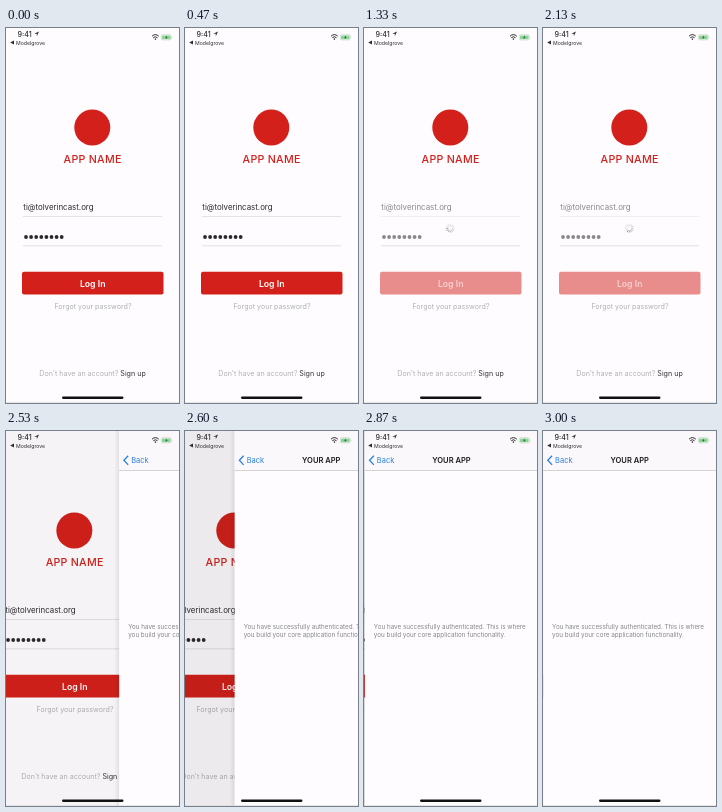
Write an HTML page that moves like this. It is 173x375 px and loops after 3.07 s.

```html
<!DOCTYPE html>
<html lang="en">
<head>
<meta charset="utf-8">
<title>Login flow</title>
<style>
  html, body { margin: 0; width: 100%; height: 100%; overflow: hidden; background: #fefcfe; }
  svg { display: block; width: 173px; height: 375px; font-family: Inter, "Liberation Sans", sans-serif; }
  .mid { text-anchor: middle; }
  .hint { font-size: 7.12px; fill: #b0b0b2; }
  .red { fill: #d3201b; }
  .rule { fill: #dfdde0; }
  .body { font-size: 6.3px; fill: #858587; }
</style>
</head>
<body>
<svg viewBox="0 0 173 375">
  <defs>
    <linearGradient id="shade">
      <stop offset="0" stop-color="#000" stop-opacity="0"/>
      <stop offset="1" stop-color="#000" stop-opacity=".08"/>
    </linearGradient>
  </defs>

  <g id="login">
    <rect width="173" height="375" fill="#fefcfe"/>
    <circle class="red" cx="86.3" cy="99.5" r="18"/>
    <text class="mid red" x="86.6" y="135.2" font-size="10.7" font-weight="500" letter-spacing=".25">APP NAME</text>
    <g id="fields" fill="#2a2a2c">
      <text x="17.3" y="182.2" font-size="7.9">ti@tolverincast.org</text>
      <g id="dots"></g>
      <rect class="rule" x="17" y="188" width="139" height=".8"/>
    </g>
    <rect class="rule" x="17" y="217.4" width="139" height=".9"/>
    <g id="button">
      <rect class="red" x="16" y="243.8" width="141.5" height="22.8" rx="2"/>
      <text id="label" class="mid" x="86.7" y="258.6" font-size="8.7" font-weight="600" fill="#fff">Log In</text>
    </g>
    <text class="mid hint" x="87" y="281">Forgot your password?</text>
    <text class="mid hint" x="86.5" y="347.8">Don't have an account? <tspan fill="#333">Sign up</tspan></text>
    <g id="spinner" transform="translate(86.3 200.3)"></g>
  </g>
  <rect id="dim" width="173" height="375"/>

  <g id="home">
    <rect x="-5" width="5" height="375" fill="url(#shade)"/>
    <rect width="173" height="375" fill="#fefcfe"/>
    <rect width="173" height="39" fill="#faf8fa"/>
    <rect y="39" width="173" height=".7" fill="#c4c2c5"/>
    <path d="M9 24.7 4.7 29.3 9 33.9" fill="none" stroke="#2a80e0" stroke-width="1.3"/>
    <text x="12" y="32.2" font-size="7.5" fill="#2a80e0">Back</text>
    <text class="mid" x="86.6" y="32" font-size="7.55" font-weight="600" fill="#1c1c1e">YOUR APP</text>
    <text class="body" x="9" y="197.9">You have successfully authenticated. This is where</text>
    <text class="body" x="9" y="205.5">you build your core application functionality.</text>
  </g>

  <g fill="#2c2c2e">
    <text x="11.6" y="8.7" font-size="7.2" font-weight="500">9:41</text>
    <path d="M33 3.4 30.8 8.2V5.7H28.2Z"/>
    <path d="M4.2 14.6 8 12.6V16.6Z"/>
    <text x="10" y="16.5" font-size="5.2">Modelgrove</text>
    <g fill="none" stroke="#2c2c2e" stroke-width="1">
      <path d="M146 8.2Q149.4 5 152.8 8.2"/>
      <path d="M147.3 9.7Q149.4 7.8 151.5 9.7"/>
    </g>
    <circle cx="149.4" cy="11.1" r=".8"/>
    <rect x="155.3" y="6.7" width="10" height="5.2" rx="1.4" fill="#fff" stroke="#b9bab9" stroke-width=".5"/>
    <rect x="156" y="7.4" width="8.6" height="3.8" rx=".8" fill="#86d992"/>
    <path d="M166 8.5v1.7q.8-.8 0-1.7Z" fill="#b9bab9"/>
    <path d="M160.9 7.5 158.8 9.6H160L159.7 11.2 161.8 9H160.6Z" fill="#4a5a4c"/>
    <rect x="56" y="368.6" width="61.5" height="2.3" rx="1.15" fill="#111"/>
  </g>
  <rect y="374.3" width="173" height=".7" fill="#dddbdd"/>
</svg>

<script>
  const LOOP = 3070, PRESS = 800, BUSY = 1000, DONE = 2400, PUSH = 2463;
  const WIDTH = 173, SPOKES = 12;
  const SPRING = Math.sqrt(1000 / 3) / 1000; // critically damped push, per ms
  const el = id => document.getElementById(id);

  function add(parent, tag, attrs) {
    const node = document.createElementNS("http://www.w3.org/2000/svg", tag);
    for (const key in attrs) node.setAttribute(key, attrs[key]);
    parent.append(node);
    return node;
  }

  for (let i = 0; i < 8; i++) {
    add(el("dots"), "circle", { cx: 20 + i * 5.1, cy: 209, r: 1.9 });
  }
  const spokes = Array.from({ length: SPOKES }, (_, i) => add(el("spinner"), "line", {
    y1: -2.4, y2: -4.1, stroke: "#88888b", "stroke-width": 0.8,
    "stroke-linecap": "round", transform: `rotate(${i * 360 / SPOKES})`
  }));

  function snap(t) {
    const start = k => Math.round(k * 20 / 3) * 10;
    let k = Math.floor(t * 0.015) + 1;
    while (start(k) > t) k--;
    return start(Math.min(k, 45));
  }

  function draw(t) {
    const busy = t >= BUSY && t < DONE;
    el("fields").setAttribute("opacity", busy ? 0.55 : 1);
    el("button").setAttribute("opacity", busy ? 0.5 : 1);
    el("label").setAttribute("opacity", t >= PRESS && t < BUSY ? 0.3 : busy ? 0.6 : 1);

    el("spinner").setAttribute("visibility", busy ? "visible" : "hidden");
    const head = Math.floor((t - BUSY) / 1000 * SPOKES) + 6;
    spokes.forEach((spoke, i) => {
      const age = (((head - i) % SPOKES) + SPOKES) % SPOKES;
      spoke.setAttribute("opacity", Math.max(0.3, 0.95 - age * 0.1));
    });

    const a = Math.max(0, t - PUSH) * SPRING;
    const p = 1 - (1 + a) * Math.exp(-a);
    el("home").setAttribute("transform", `translate(${WIDTH * (1 - p)} 0)`);
    el("home").setAttribute("visibility", p > 0 ? "visible" : "hidden");
    el("login").setAttribute("transform", `translate(${-0.3 * WIDTH * p} 0)`);
    el("dim").setAttribute("opacity", 0.1 * p);
  }

  const begin = performance.now();
  function tick() {
    draw(snap((performance.now() - begin) % LOOP));
    requestAnimationFrame(tick);
  }
  tick();
</script>
</body>
</html>
```
